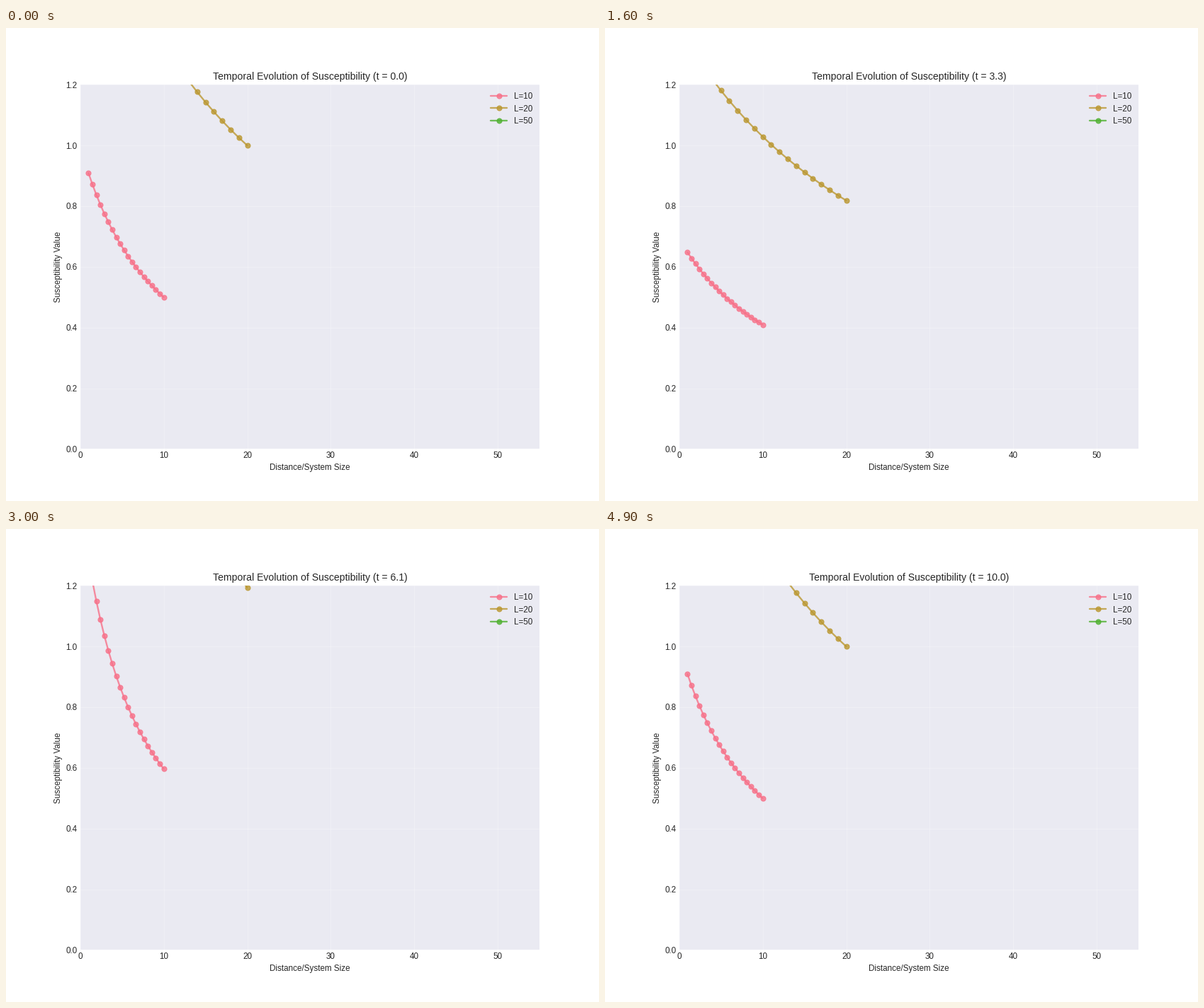
These frames come from a looping animation (837 px wide and 669 px high, 5000 ms). A matplotlib script:

```python
import numpy as np
import matplotlib.pyplot as plt
from matplotlib.animation import FuncAnimation

WIDTH, HEIGHT, DPI = 837, 669, 83.7
FRAMES, INTERVAL = 50, 100
DURATION = 10.0

plt.style.use("seaborn-v0_8-darkgrid")
plt.rcParams["font.family"] = "Liberation Sans"

SYSTEMS = {
    10: (0.9678, 0.4413, 0.5358),
    20: (0.7350, 0.5953, 0.1944),
    50: (0.3127, 0.6929, 0.1924),
}


def susceptibility(x, size, t):
    damping = 1 + 0.5 * np.sin(2 * np.pi * t / DURATION)
    return (size / 10) / (damping + x / size)


# The tiny margin keeps the pixel height from rounding down.
fig, ax = plt.subplots(figsize=(WIDTH / DPI, (HEIGHT + 1e-6) / DPI), dpi=DPI)
ax.set_xlim(0, 55)
ax.set_ylim(0, 1.2)
ax.set_xlabel("Distance/System Size")
ax.set_ylabel("Susceptibility Value")
ax.grid(True, alpha=0.3)
title = ax.set_title("")

curves = []
for size, color in SYSTEMS.items():
    x = np.linspace(1, size, 20)
    line, = ax.plot(x, susceptibility(x, size, 0), "o-", color=color,
                    linewidth=2, markersize=6, alpha=0.8, label=f"L={size}")
    curves.append((line, x, size))
ax.legend(loc="upper right")


def update(frame):
    t = DURATION * frame / (FRAMES - 1)
    for line, x, size in curves:
        line.set_ydata(susceptibility(x, size, t))
    title.set_text(f"Temporal Evolution of Susceptibility (t = {t:.1f})")
    return [line for line, _, _ in curves] + [title]


anim = FuncAnimation(fig, update, frames=FRAMES, interval=INTERVAL,
                     repeat=True, repeat_delay=0, blit=False)
plt.show()
```
